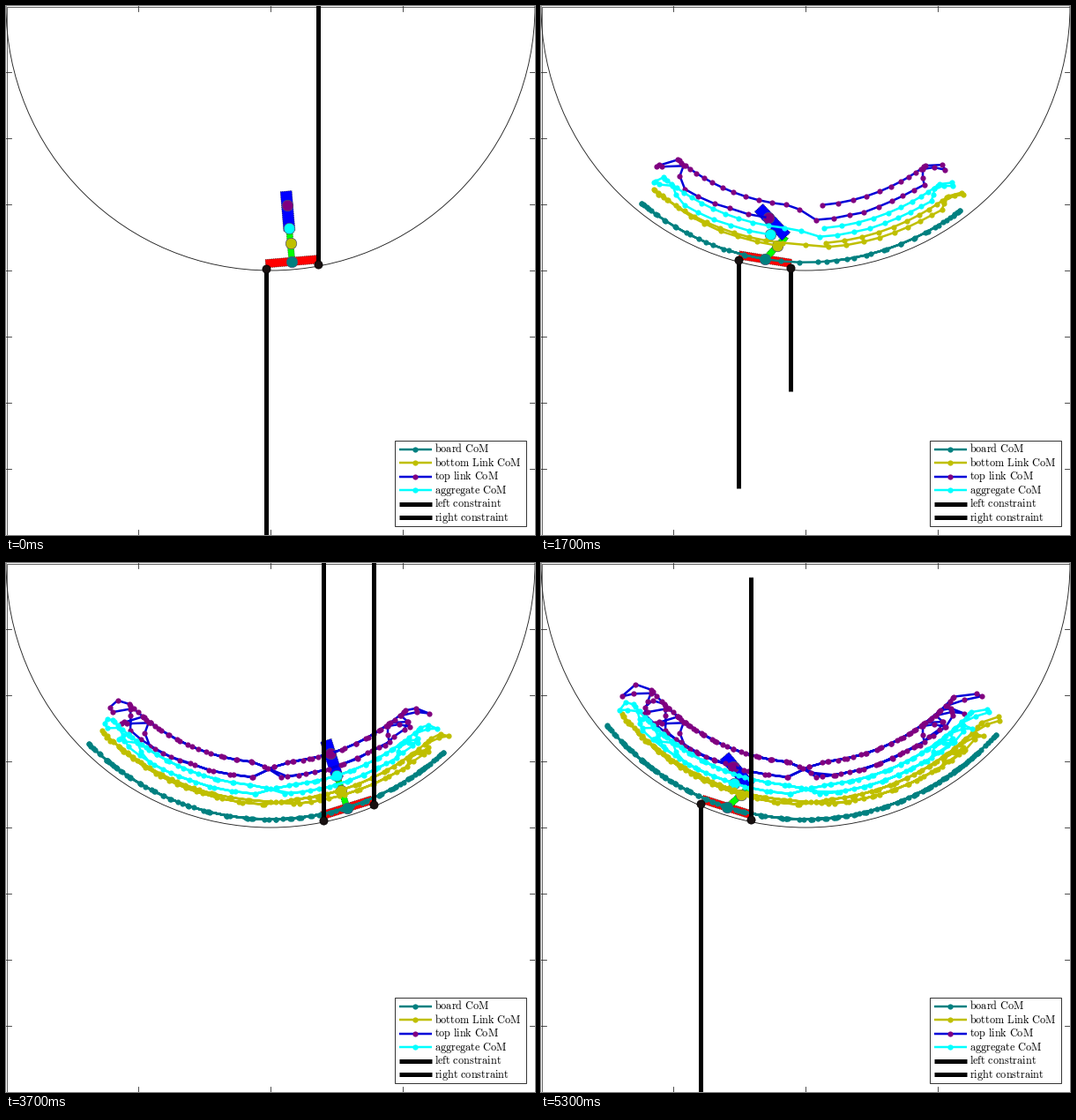
A matplotlib script that plays this animation: 600x600 px, repeating every 5.4 s.

```python
import numpy as np
import matplotlib.pyplot as plt
from matplotlib.animation import FuncAnimation
from matplotlib.patches import Circle, Polygon, Rectangle

FRAMES, STEPS = 54, 3          # simulation steps per drawn frame
CX, RADIUS = 300, 300
BOARD_R, END_R = 290.8, 297.6  # board centre and board ends from the bowl centre
HALF_ANGLE = np.radians(5.75)
LEG, LEG_COM, TORSO, TORSO_COM = 35, 21, 45, 29.3
MASS = 0.23, 0.264, 0.506
TEAL, OLIVE, PURPLE = (0, .5, .5), (.75, .75, 0), (.5, 0, .5)
BLUE, CYAN, INK = (0, 0, .85), (0, 1, 1), "#222222"
PT = 0.72                      # points per pixel at 100 dpi

plt.rcParams["mathtext.fontset"] = "cm"


def heading(lean):
    return np.stack([np.sin(lean), -np.cos(lean)], axis=-1)


def on_bowl(angle, r):
    return np.stack([CX + r * np.sin(angle), r * np.cos(angle)], axis=-1)


# The board eases between turning points that climb a little with each swing
step = np.arange(FRAMES * STEPS)
turn = np.array([-13, 11.5, 40.5, 65.6, 94.8, 121.3, 147.7, 177.4])
k = np.arange(len(turn))
peak = (34.25 + 2.75 * k) * (-1.0) ** (k + 1)
j = np.searchsorted(turn, step, side="right") - 1
since = step - turn[j]
part = since / (turn[j + 1] - turn[j])
tilt = peak[j] + (peak[j + 1] - peak[j]) * (1 - np.cos(np.pi * part)) / 2
phi = np.radians(tilt)

# The rider crouches on the way down, bounces once and stands up at the bottom
crouch = np.clip(since + .3, 0, 1) * np.clip((.53 - part) / .06, 0, 1)
crouch *= 1 - .75 * np.exp(-((since - 3.5) / .9) ** 2)
rng = np.random.default_rng(4)
shake = rng.normal(0, 9, (2, len(step))) * np.exp(-since / 4)
leg_angle = crouch * (37 + .4 * tilt + shake[0])
torso_angle = crouch * (-48 + .6 * tilt + shake[1])
leg_dir = heading(np.radians(leg_angle) - phi)
torso_dir = heading(np.radians(torso_angle) - phi)

board = on_bowl(phi, BOARD_R)
leg = board + LEG_COM * leg_dir
hip = board + LEG * leg_dir
torso = hip + TORSO_COM * torso_dir
total = MASS[0] * board + MASS[1] * leg + MASS[2] * torso
ends = on_bowl(phi - HALF_ANGLE, END_R), on_bowl(phi + HALF_ANGLE, END_R)

# Constraint forces in pixels at a few frames, positive is up
force_t = [0, 10, 17, 25, 37, 44, 53]
forces = ([-420, -420, -259, 420, 420, -67, -420],
          [420, 420, -140, -420, 420, -420, 275])

fig = plt.figure(figsize=(6, 6), dpi=100, facecolor="white")
ax = fig.add_axes([0, 0, 1, 1])
ax.set(xlim=(0, 600), ylim=(600, 0))
ax.axis("off")


def line(xs, ys, color, width, **kw):
    return ax.plot(xs, ys, color=color, lw=width * PT, **kw)[0]


# Axes frame, ticks and bowl
ax.add_patch(Rectangle((.5, .5), 599, 600, fill=False, ec=INK, lw=.5))
for edge in (0, 594):
    for x in range(150, 600, 150):
        line([x, x], [edge, edge + 6], INK, .8)
    for y in range(75, 600, 75):
        line([edge, edge + 6], [y, y], INK, .8)
ax.add_patch(Circle((CX, 0), RADIUS, fill=False, ec=INK, lw=.65))


def bar_shape(start, along, length, width):
    side = np.array([-along[1], along[0]]) * width / 2
    stop = start + along * length
    return [start + side, stop + side, stop - side, start - side]


def bar(color):
    patch = Polygon(np.zeros((4, 2)), fc=color, ec="black", lw=.5, ls=":", zorder=3)
    return ax.add_patch(patch)


board_bar, leg_bar, torso_bar = bar("red"), bar((0, 1, 0)), bar((0, 0, 1))

tracks = [
    (board, TEAL, TEAL, "board CoM"),
    (leg, OLIVE, OLIVE, "bottom Link CoM"),
    (torso, BLUE, PURPLE, "top link CoM"),
    (total, CYAN, CYAN, "aggregate CoM"),
]
dots, trails = [], []
for _, color, fill, _ in tracks:
    dots.append(line([], [], color, 0, marker="o", ms=12.5 * PT, mfc=fill,
                     mec="#505070", mew=.5, zorder=4))
    trails.append(line([], [], color, 2.5, marker="o", ms=6.2 * PT, mfc=fill,
                       mew=0, zorder=5))
rods = [line([], [], "black", 5, solid_capstyle="butt", zorder=6) for _ in ends]
pins = [line([], [], "black", 0, marker="o", ms=9.2 * PT, mfc="#181010",
             mec="black", mew=.5, zorder=7) for _ in ends]

# Legend
ax.add_patch(Rectangle((440.5, 492.8), 149.5, 97, fc="white", ec=INK,
                       lw=.65, zorder=8))
rows = [(color, fill, text, 2.5) for _, color, fill, text in tracks]
rows += [("black", None, side + " constraint", 5) for side in ("left", "right")]
for row, (color, fill, text, width) in enumerate(rows):
    y = 502.7 + 15.45 * row
    line([445.5, 482.5], [y, y], color, width, solid_capstyle="butt", zorder=9)
    if fill:
        line([464], [y], color, 0, marker="o", ms=6.2 * PT, mfc=fill, mew=0,
             zorder=10)
    label = text.replace(" ", r"\ ")
    ax.text(486.3, y + 3.6, rf"$\mathrm{{{label}}}$", fontsize=12.3 * PT,
            va="baseline", zorder=10)


def draw(frame):
    n = frame * STEPS
    level = heading(np.pi / 2 - phi[n])
    board_bar.set_xy(bar_shape(board[n] - 30 * level, level, 60, 9.5))
    leg_bar.set_xy(bar_shape(board[n], leg_dir[n], LEG, 7))
    torso_bar.set_xy(bar_shape(hip[n], torso_dir[n], TORSO, 13))
    for (path, *_), dot, trail in zip(tracks, dots, trails):
        dot.set_data(path[n:n + 1].T)
        trail.set_data(path[:n + 1].T)
    for end, force, rod, pin in zip(ends, forces, rods, pins):
        x, y = end[n]
        rod.set_data([x, x], [y, y - np.interp(frame, force_t, force)])
        pin.set_data([x], [y])
    return [board_bar, leg_bar, torso_bar, *dots, *trails, *rods, *pins]


anim = FuncAnimation(fig, draw, frames=FRAMES, interval=100, repeat=True,
                     repeat_delay=0, blit=False)
plt.show()
```
